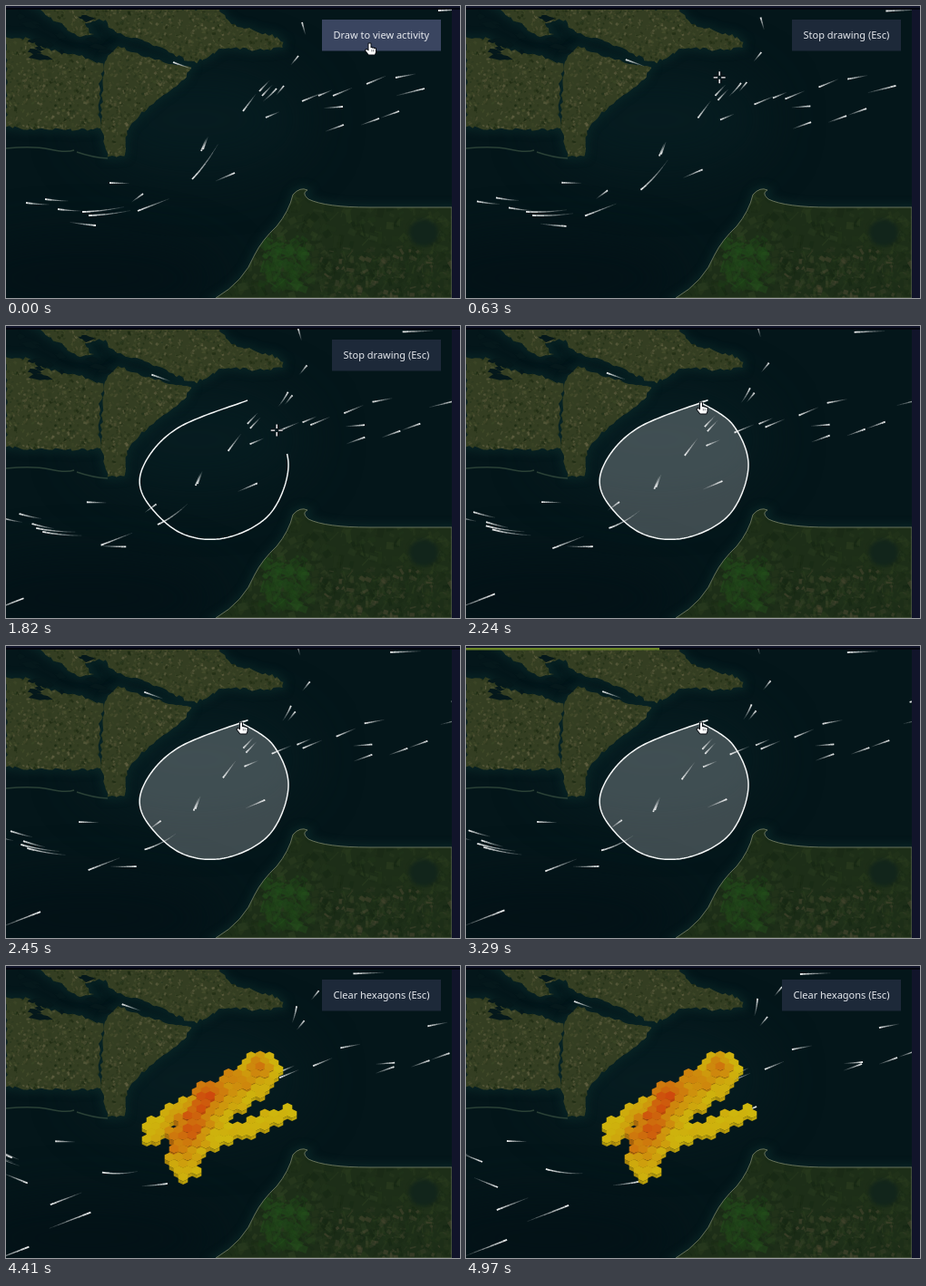
An HTML page with a canvas that plays this animation: 500 px wide and 322 px high, repeating every 5040 ms.

```html
<!DOCTYPE html>
<html lang="en">
<head>
<meta charset="utf-8">
<title>Draw to view activity</title>
<style>
  html, body { margin: 0; width: 100%; height: 100%; overflow: hidden; background: #04161a; }
  canvas { display: block; width: 500px; height: 322px; }
</style>
</head>
<body>
<canvas id="stage" width="500" height="322"></canvas>
<script>
const W = 500, H = 322, MAP_RIGHT = 491, LOOP = 5040;
const CLICK = 140, LEAVE = 350, DRAW = 840, CLOSE = 2240, LOAD = 2660, RESULT = 3570, HIDE = 4340;
const ctx = document.getElementById('stage').getContext('2d');

function seeded(seed) {
  return () => {
    seed = (seed * 1664525 + 1013904223) >>> 0;
    return seed / 4294967296;
  };
}
const mix = (a, b, k) => a + (b - a) * k;
const clamp = k => Math.max(0, Math.min(1, k));
const pairs = flat => Array.from({ length: flat.length / 2 }, (_, i) => flat.slice(2 * i, 2 * i + 2));

// ---- map ----
function coast(rand, amount, ...flat) {
  const points = pairs(flat), path = new Path2D();
  points.forEach(([x, y], i) => {
    const [x2, y2] = points[(i + 1) % points.length];
    const n = Math.max(1, Math.round(Math.hypot(x2 - x, y2 - y) / 4));
    for (let j = 0; j < n; j++)
      path.lineTo(mix(x, x2, j / n) + (rand() - .5) * amount, mix(y, y2, j / n) + (rand() - .5) * amount);
  });
  path.closePath();
  return path;
}

function fields(c, rand, count, [x1, y1, x2, y2], colors, size) {
  for (let i = 0; i < count; i++) {
    c.save();
    c.translate(mix(x1, x2, rand()), mix(y1, y2, rand()));
    c.rotate(rand() * 3);
    c.globalAlpha = .15 + rand() * .5;
    c.fillStyle = colors[Math.floor(rand() * colors.length)];
    c.fillRect(0, 0, 1 + rand() * size, 1 + rand() * size * .6);
    c.restore();
  }
}

function blob(c, color, x, y, rx, ry, blur) {
  c.save();
  c.filter = `blur(${blur}px)`;
  c.fillStyle = color;
  c.beginPath();
  c.ellipse(x, y, rx, ry, 0, 0, 7);
  c.fill();
  c.restore();
}

function makeMap() {
  const map = document.createElement('canvas');
  map.width = W;
  map.height = H;
  const c = map.getContext('2d'), rand = seeded(11);
  c.fillStyle = '#04161a';
  c.fillRect(0, 0, W, H);
  blob(c, '#061c20', 210, 125, 120, 60, 30);
  blob(c, '#031217', 90, 300, 150, 45, 25);

  const islands = [
    coast(rand, 4, 34, 3, 128, 3, 112, 14, 88, 19, 95, 33, 74, 32, 60, 20),
    coast(rand, 4, 98, 3, 234, 3, 248, 20, 300, 35, 306, 43, 292, 48, 236, 47, 210, 62, 190, 56, 160, 42, 120, 28),
    coast(rand, 4, 0, 35, 22, 36, 46, 47, 84, 56, 106, 64, 102, 110, 105, 136, 50, 136, 0, 134),
    coast(rand, 3, 108, 62, 122, 44, 160, 58, 204, 68, 196, 81, 146, 120, 133, 138, 130, 166, 112, 166, 104, 130)
  ];
  const cape = new Path2D('M231 322Q262 304 274 274Q282 258 298 243Q312 226 316 208'
    + 'Q324 199 332 203Q325 206 333 213Q352 222 400 222L491 222V322Z');

  c.save();
  c.filter = 'blur(4px)';
  c.lineWidth = 6;
  c.strokeStyle = '#0a2727';
  [...islands, cape].forEach(p => c.stroke(p));
  c.restore();

  c.lineWidth = 1.5;
  c.strokeStyle = '#2a4036';
  c.stroke(new Path2D('M0 157Q30 154 48 158T75 159M78 161Q95 167 112 168'));

  for (const island of islands) {
    c.save();
    c.fillStyle = '#343e22';
    c.fill(island);
    c.clip(island);
    fields(c, rand, 4200, [0, 0, 310, 172], ['#4d5431', '#18260f', '#545436', '#6a6748', '#22321a', '#3c4727'], 3.5);
    c.restore();
  }
  // Sounds and inlets break up the north-west.
  c.fillStyle = '#05181b';
  for (let i = 0; i < 14; i++) {
    const x = rand() * 125, y = 8 + rand() * 48, w = 4 + rand() * 12;
    c.fill(coast(rand, 3, x - w, y, x, y - 3, x + w, y + 2, x, y + 4));
  }

  c.save();
  c.fillStyle = '#1d2e18';
  c.fill(cape);
  c.clip(cape);
  fields(c, rand, 600, [240, 205, 495, 322], ['#152613', '#283a1d', '#20331a', '#2d3f21'], 13);
  fields(c, rand, 260, [345, 265, 495, 322], ['#4d4933', '#3b412a', '#1a2b16', '#2f3f22'], 8);
  fields(c, rand, 130, [284, 254, 335, 306], ['#20491a', '#244f1c', '#1e4118'], 14);
  blob(c, '#12251b', 460, 250, 16, 15, 2);
  c.restore();
  c.lineWidth = 1;
  c.strokeStyle = '#66715a';
  c.stroke(cape);

  c.fillStyle = '#11142a';
  c.fillRect(MAP_RIGHT, 0, W - MAP_RIGHT, H);
  c.fillRect(0, 0, W, 2);
  c.fillStyle = '#04060e';
  c.fillRect(0, 2, W, 2);
  return map;
}

// ---- vessel trails: ships in a lane share one course (dx, dy, bend) from their own start ----
const TAIL = .31;
const ships = [];
const lane = (dx, dy, bend, ...starts) => pairs(starts).forEach(([x, y]) => ships.push({ x, y, dx, dy, bend }));

lane(66, -5, 0, 371, 111);
lane(64, -23, 0, 372, 131, 411, 124, 433, 116);
lane(99, -25, 0, 461, 91);
lane(-68, 28, 0, 360, 99, 326, 105, 397, 86);
lane(-70, 13, 0, 429, 79, 525, 55);
lane(-48, 20, 0, 286, 123, 344, 99);
lane(-36, 38, 0, 279, 94, 282, 99);
lane(-45, 60, 0, 261, 116);
lane(-17, 44, 0, 215, 160, 217, 158);
lane(23, -55, 5, 298, 91);
lane(26, -32, 0, 306, 88, 322, 55);
lane(-12, -43, 0, 326, 18);
lane(-108, 4, 0, 476, 5);
lane(-65, -23, 0, 184, 62);
lane(-117, 33, -18, 205, 191);
lane(-111, 43, 0, 145, 226);
lane(-132, -38, -11, 91, 231, 84, 227);
lane(-75, -26, -4, 57, 224, 43, 213, 22, 217);
lane(-69, -2, 0, 114, 195);
lane(91, -4, 3, 99, 242);
lane(68, -29, 0, 252, 184);
lane(40, -29, 0, 151, 207);
lane(147, -57, 0, -34, 321, -102, 359);
lane(84, 34, 0, -49, 210, -66, 182);

function position({ x, y, dx, dy, bend }, s) {
  const side = 4 * bend * s * (1 - s) / Math.hypot(dx, dy);
  return [x + dx * s - dy * side, y + dy * s + dx * side];
}

// Traffic stalls while results load, then catches up.
const travel = t => t < RESULT ? Math.min(.52, t * .0002) : .665 + (t - RESULT) * .00024;

function drawTrails(u) {
  const parts = 10;
  ctx.strokeStyle = '#fff';
  for (const ship of ships)
    for (let i = 1; i <= parts; i++) {
      const k = i / parts;
      ctx.globalAlpha = .05 + .85 * k;
      ctx.lineWidth = .7 + 1.1 * k;
      ctx.beginPath();
      ctx.moveTo(...position(ship, u - TAIL * (1 - k + 1 / parts)));
      ctx.lineTo(...position(ship, u - TAIL * (1 - k)));
      ctx.stroke();
    }
  ctx.globalAlpha = 1;
}

// ---- hand-drawn area ----
function spline(p) {
  const out = [], at = i => p[Math.max(0, Math.min(p.length - 1, i))];
  for (let i = 0; i < p.length - 1; i++)
    for (let k = 0; k < 1; k += .04)
      out.push([0, 1].map(d => {
        const [a, b, c, e] = [at(i - 1)[d], at(i)[d], at(i + 1)[d], at(i + 2)[d]];
        return b + .5 * k * (c - a + k * (2 * a - 5 * b + 4 * c - e + k * (3 * (b - c) + e - a)));
      }));
  return [...out, at(p.length)];
}
const outline = spline(pairs([266, 82, 190, 112, 153, 151, 151, 187, 190, 227, 240, 234, 290, 208, 311, 155, 294, 109, 258, 84]));
const reached = t => Math.round(clamp((t - DRAW) / (CLOSE - DRAW)) ** .6 * (outline.length - 1));

function drawArea(t) {
  if (t < DRAW || t >= RESULT) return;
  ctx.beginPath();
  outline.slice(0, reached(t) + 1).forEach(p => ctx.lineTo(...p));
  if (t >= CLOSE) {
    ctx.closePath();
    ctx.fillStyle = 'rgba(235,232,234,.25)';
    ctx.fill();
  }
  ctx.lineWidth = 1.5;
  ctx.lineJoin = 'round';
  ctx.strokeStyle = '#f4f6f6';
  ctx.stroke();
}

// ---- hexagons: cells near a lane, hotter near the busiest stretch ----
function distance(x, y, x1, y1, x2, y2) {
  const dx = x2 - x1, dy = y2 - y1;
  const k = clamp(((x - x1) * dx + (y - y1) * dy) / (dx * dx + dy * dy));
  return Math.hypot(x - x1 - k * dx, y - y1 - k * dy);
}

function makeHexes() {
  const rand = seeded(5), list = [];
  const inside = (x, y) => distance(x, y, 284, 112, 212, 172, ) < 20
    || distance(x, y, 208, 178, 196, 214) < 19
    || distance(x, y, 163, 182, 222, 142) < 13
    || distance(x, y, 222, 192, 308, 161) < 8;
  const hole = (x, y) => Math.min(Math.hypot(x - 188, y - 177), Math.hypot(x - 259, y - 164)) < 6;
  for (let y = 92; y < 236; y += 7)
    for (let x = 145 + y % 2 * 5; x < 318; x += 10) {
      const jitter = rand();
      if (!inside(x, y) || hole(x, y)) continue;
      const core = Math.exp(-((distance(x, y, 232, 126, 194, 194) / 17) ** 2));
      const branch = .55 * Math.exp(-((distance(x, y, 240, 145, 278, 112) / 13) ** 2));
      list.push({ x, y, heat: Math.max(core, branch) * (.5 + .5 * jitter) + .1 * jitter });
    }
  return list;
}
const hexes = makeHexes();

function face(color, ...flat) {
  ctx.fillStyle = color;
  ctx.beginPath();
  pairs(flat).forEach(p => ctx.lineTo(...p));
  ctx.fill();
}

function drawHexes() {
  const r = 5.3;
  for (const { x, y, heat } of hexes) {
    const top = y + 1 - heat * 6, base = y + 4;
    const tone = light => `hsl(${53 - heat * 34} 88% ${light}%)`;
    face(tone(35), x - r, top + 2.5, x, top + 5, x, base + 5, x - r, base + 2.5);
    face(tone(39), x + r, top + 2.5, x, top + 5, x, base + 5, x + r, base + 2.5);
    face(tone(43), x - r, top - 2.5, x, top - 5, x + r, top - 2.5, x + r, top + 2.5, x, top + 5, x - r, top + 2.5);
  }
}

// ---- interface ----
function drawButton(t) {
  if (t >= CLOSE && t < RESULT) return;
  const label = t < CLICK ? 'Draw to view activity' : t < CLOSE ? 'Stop drawing (Esc)' : 'Clear hexagons (Esc)';
  ctx.font = '11px "Noto Sans", sans-serif';
  const width = Math.round(ctx.measureText(label).width) + 25;
  ctx.fillStyle = t < LEAVE ? '#3a4560' : '#1d2939';
  ctx.fillRect(479 - width, 15, width, 34.5);
  ctx.fillStyle = '#e6e9ee';
  ctx.fillText(label, 479 - width + 12.5, 36);
}

function drawBar(t) {
  if (t < LOAD || t >= RESULT) return;
  ctx.fillStyle = '#6b8527';
  ctx.fillRect(0, 2, 213 * clamp((t - LOAD) / 630) ** 2.4, 2.5);
}

const handShape = new Path2D('M-2.5 -5.5h2v4.5h1.5v.5h2v.5h2v4l-1 2.5h-6.5l-3.5-4.5 1-1 2.5 1.5z');
const fingers = new Path2D('M.8 1v2.5M2.7 1v2.5');
const crossShape = new Path2D('M-6.5 0H-2M2 0H6.5M0 -6.5V-2M0 2V6.5');

function cursorAt(t) {
  if (t >= CLOSE) return [260.5, 90];
  if (t >= DRAW) return outline[reached(t + 130)];
  const k = 1 - (1 - clamp((t - CLICK) / (DRAW - CLICK))) ** 2;
  return [mix(402, 267, k), mix(47, 82, k)];
}

function drawCursor(t) {
  if (t >= HIDE) return;
  ctx.save();
  ctx.translate(...cursorAt(t));
  ctx.lineJoin = 'round';
  ctx.strokeStyle = '#0a0e14';
  if (t < LEAVE || t >= CLOSE) {
    ctx.lineWidth = 2;
    ctx.stroke(handShape);
    ctx.fillStyle = '#fff';
    ctx.fill(handShape);
    ctx.lineWidth = .5;
    ctx.stroke(fingers);
  } else {
    ctx.lineWidth = 3;
    ctx.stroke(crossShape);
    ctx.strokeStyle = '#fff';
    ctx.lineWidth = 1.4;
    ctx.stroke(crossShape);
  }
  ctx.restore();
}

const map = makeMap();

function render(t) {
  ctx.drawImage(map, 0, 0);
  ctx.save();
  ctx.beginPath();
  ctx.rect(0, 3, MAP_RIGHT, H);
  ctx.clip();
  drawArea(t);
  drawTrails(travel(t));
  if (t >= RESULT) drawHexes();
  ctx.restore();
  drawBar(t);
  drawButton(t);
  drawCursor(t);
}

// The picture advances in alternating holds of 140 and 70 ms.
const hold = t => t - t % 210 + (t % 210 >= 140 ? 140 : 0);
const start = performance.now();
let shown = -1;
function tick() {
  const t = hold((performance.now() - start) % LOOP);
  if (t !== shown) render(shown = t);
  requestAnimationFrame(tick);
}
tick();
</script>
</body>
</html>
```
